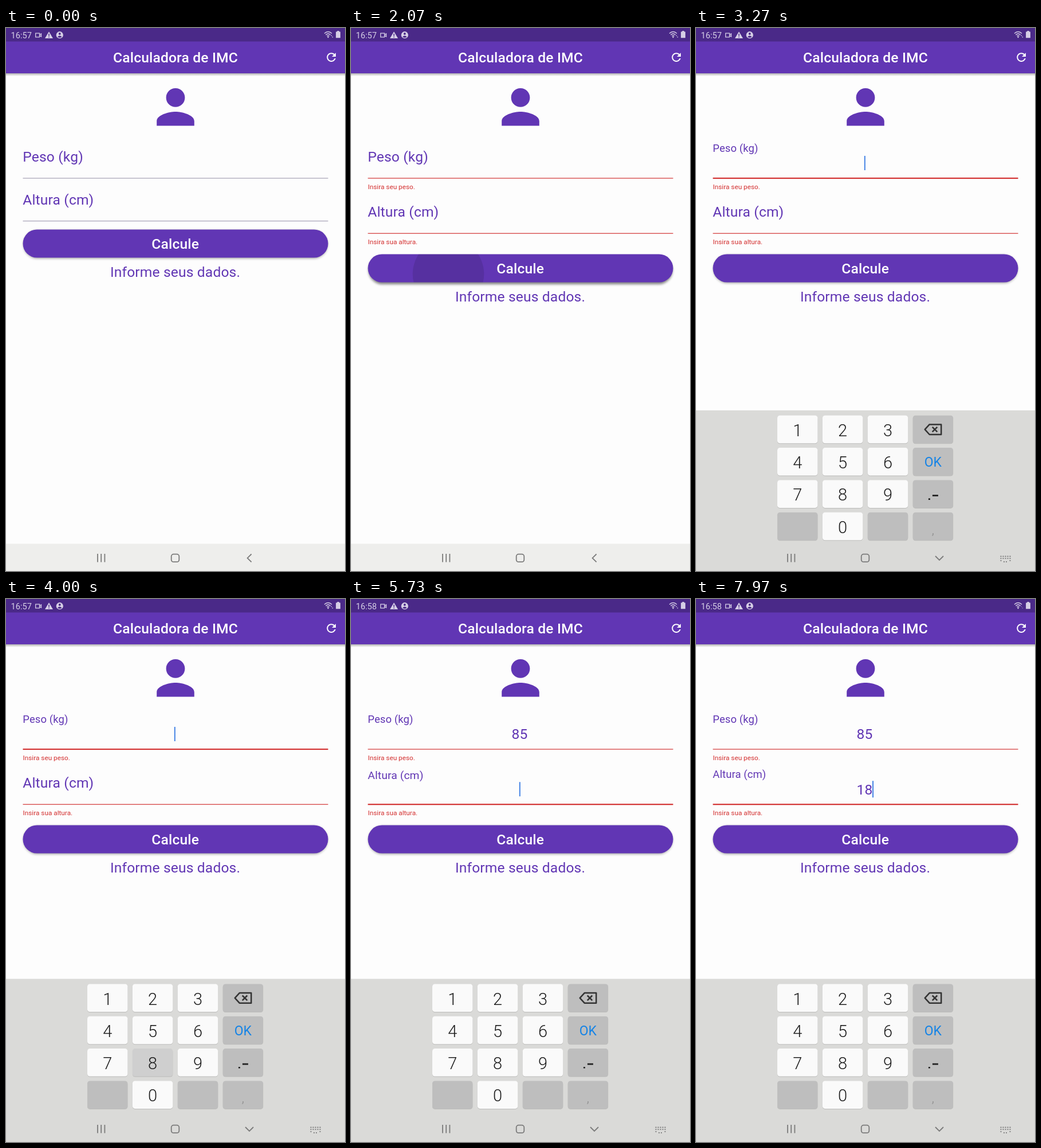
Write an HTML page that moves like this. It is 592 by 947 pixels and loops after 8000 ms.

```html
<!DOCTYPE html>
<html lang="pt">
<head>
<meta charset="utf-8">
<title>IMC</title>
<style>
  html, body { margin: 0; width: 100%; height: 100%; overflow: hidden; background: #fdfdfd; }
  svg { display: block; width: 100%; height: 100%; font-family: Roboto, sans-serif; }
  .big { font-size: 24.6px; letter-spacing: .15px; }
  .mid { text-anchor: middle; }
  .bold { font-weight: 500; fill: #fff; }
  .err { font-size: 11.8px; fill: #d32f2f; }
  .digit { font-size: 29px; font-weight: 300; fill: #1c1c1c; }
  .line { fill: none; stroke: #7b7b7b; stroke-width: 1.8; }
</style>
</head>
<body>
<svg viewBox="0 0 592 947" preserveAspectRatio="none">
  <defs>
    <linearGradient id="barShade" x2="0" y2="1">
      <stop stop-color="#000" stop-opacity=".3"/>
      <stop offset="1" stop-color="#000" stop-opacity="0"/>
    </linearGradient>
    <filter id="soft" x="-5%" y="-30%" width="110%" height="170%"><feGaussianBlur stdDeviation="2"/></filter>
    <clipPath id="pill"><rect x="29.5" y="351.5" width="533" height="49" rx="24.5"/></clipPath>
  </defs>
  <rect width="592" height="947" fill="#fdfdfd"/>

  <rect y="79" width="592" height="5" fill="url(#barShade)"/>
  <rect width="592" height="79" fill="#6136b4"/>
  <rect width="592" height="23.5" fill="#4a2988"/>
  <text class="big mid bold" x="296" y="60">Calculadora de IMC</text>
  <path transform="translate(556.3 39.3) scale(.984)" fill="#fff" d="M17.65 6.35C16.2 4.9 14.21 4 12 4c-4.42 0-7.99 3.58-7.99 8s3.57 8 7.99 8c3.73 0 6.84-2.55 7.73-6h-2.08c-.82 2.33-3.04 4-5.65 4-3.31 0-6-2.69-6-6s2.69-6 6-6c1.66 0 3.14.69 4.22 1.78L13 11h7V4z"/>

  <g fill="#d6cfe6">
    <text id="clock" x="8.5" y="17.6" font-size="14.6"></text>
    <path d="M51.7 9.2h6.8v6.6h-6.8zM58.5 12l3-2v5l-3-2" fill="none" stroke="#d6cfe6" stroke-width="1.3"/>
    <path d="M75 6.2 82 18H68z"/>
    <path d="M75 10v4M75 15v1.6" stroke="#4a2988" stroke-width="1.5"/>
    <circle cx="93.8" cy="12.2" r="6.1"/>
    <circle cx="93.8" cy="10" r="1.9" fill="#4a2988"/>
    <path d="M90 15.6q3.8-4 7.6 0-3.8 2.6-7.6 0" fill="#4a2988"/>
    <path d="M556 9.5q6.5-6 13 0M558.3 12q4.2-4 8.4 0M560.5 14.3q2-2 4 0" fill="none" stroke="#d6cfe6" stroke-width="1.4"/>
    <circle cx="562.5" cy="16" r="1.2"/>
    <path id="traffic" d="M567.2 13.8 568.4 12l1.2 1.8zM569 15.2h2.4l-1.2 1.8z"/>
    <path d="M578.3 5h3.4v1.6h2.2v10.7h-7.8V6.6h2.2z"/>
  </g>

  <path transform="translate(246.8 88.6) scale(4.1)" fill="#6136b4" d="M12 12c2.21 0 4-1.79 4-4s-1.79-4-4-4-4 1.79-4 4 1.79 4 4 4zm0 2c-2.67 0-8 1.34-8 4v2h16v-2c0-2.66-5.33-4-8-4z"/>

  <g id="fields"></g>

  <g id="lower">
    <rect id="shadow" x="30.5" y="353" width="531" height="49" rx="24.5" filter="url(#soft)"/>
    <rect x="29.5" y="351.5" width="533" height="49" rx="24.5" fill="#6136b4"/>
    <g clip-path="url(#pill)"><circle id="ripple" fill="#000"/></g>
    <text class="big mid bold" x="295.7" y="385">Calcule</text>
    <text class="big mid" x="295.5" y="433.7" fill="#6136b4">Informe seus dados.</text>
  </g>

  <rect y="899.5" width="592" height="47.5" fill="#eeeeec"/>
  <g id="keyboard"><rect y="662.5" width="592" height="300" fill="#dadad8"/></g>
  <g class="line">
    <path d="M160 917v14.5M166.2 917v14.5M172.4 917v14.5"/>
    <rect x="288.7" y="917.6" width="13.6" height="13.6" rx="4"/>
    <path id="back" d="M428.6 917.5 421.6 924.4 428.6 931.3"/>
    <path id="down" d="M418 921 425 928 432 921"/>
    <path id="kbIcon" stroke-dasharray="2 2" d="M531.5 921.5h18M531.5 925.2h18M531.5 928.8h2m3.5 2h8M547.5 928.8h2"/>
  </g>
</svg>
<script>
const LOOP = 8000;
const OPEN = 815, FOCUS = 2950, NEXT = 5600, KB_START = 3000, KB_TIME = 360, KB_HEIGHT = 285;
const PURPLE = '#6136b4';
const $ = id => document.getElementById(id);

const TAPS = [
  { down: 781, up: 830, x: 468, y: 379, speed: .306, reach: 440 },
  { down: 1912, up: 2080, x: 170, y: 386, speed: .392, reach: 393 }
];
// key, pressed, released
const PRESSES = [['8', 3960, 4050], ['5', 4360, 4450], ['OK', 5520, 5600], ['1', 6360, 6450], ['8', 7400, 7490]];

const FIELDS = [
  { name: 'Peso (kg)', error: 'Insira seu peso.', y: 0, gap: 0, focus: FOCUS, blur: NEXT, typed: [[4050, '8'], [4450, '85']] },
  { name: 'Altura (cm)', error: 'Insira sua altura.', y: 74.6, gap: 21.6, focus: NEXT, blur: Infinity, typed: [[6450, '1'], [7490, '18']] }
];

const progress = (t, start, length) => Math.min(1, Math.max(0, (t - start) / length));
const ease = u => u * u * (3 - 2 * u);
const mix = (a, b, u) => a + (b - a) * u;

function add(parent, tag, attrs, text = '') {
  const node = document.createElementNS('http://www.w3.org/2000/svg', tag);
  set(node, attrs);
  node.textContent = text;
  return parent.appendChild(node);
}
function set(node, attrs) {
  for (const name in attrs) node.setAttribute(name, attrs[name]);
}

for (const f of FIELDS) {
  f.group = add($('fields'), 'g', {});
  f.label = add(f.group, 'text', { class: 'big', fill: PURPLE }, f.name);
  f.rule = add(f.group, 'rect', { x: 29.5, width: 533 });
  f.hint = add(f.group, 'text', { class: 'err', x: 29.5 }, f.error);
  f.value = add(f.group, 'text', { class: 'big mid', x: 294.4, y: 244.4, fill: PURPLE });
  f.caret = add(f.group, 'rect', { width: 2, fill: '#4584e4' });
}

const keys = {};
[['1', '2', '3', 'del'], ['4', '5', '6', 'OK'], ['7', '8', '9', '.-'], ['', '0', '', ',']].forEach((row, r) =>
  row.forEach((key, c) => {
    const x = 142 + c * 78.9, y = 671.5 + r * 56.3, cx = x + 35.2;
    const isDigit = /\d/.test(key), fill = isDigit ? '#fafafa' : '#bebebe';
    const kb = $('keyboard');
    add(kb, 'rect', { x, y: y + 1, width: 70.4, height: 48.5, rx: 4.5, fill: '#bcbcba' });
    keys[key] = { fill, node: add(kb, 'rect', { x, y, width: 70.4, height: 48.5, rx: 4.5, fill }) };
    if (isDigit) add(kb, 'text', { class: 'digit mid', x: cx, y: y + 36 }, key);
    if (key === 'OK') add(kb, 'text', { class: 'mid', x: cx, y: y + 33, 'font-size': 23, fill: '#1483e6' }, key);
    if (key === '.-') add(kb, 'path', { d: `M${cx - 8} ${y + 33.2}h3M${cx - 1} ${y + 27}h10`, stroke: '#222', 'stroke-width': 2.6 });
    if (key === ',') add(kb, 'text', { class: 'mid', x: cx, y: y + 38, 'font-size': 21, fill: '#989898' }, key);
    if (key === 'del') add(kb, 'path', {
      d: `M${x + 29} ${y + 15.6}h20.5v17.6h-20.5l-8-8.8zM${x + 34} ${y + 20}l8.6 8.6m0-8.6l-8.6 8.6`,
      fill: 'none', stroke: '#333', 'stroke-width': 2.5, 'stroke-linejoin': 'round'
    });
  }));

function drawField(f, t) {
  const open = t >= OPEN;
  const red = progress(t, 835, 165);
  const float = ease(progress(t, f.focus, 170));
  const focused = t >= f.focus && t < f.blur;
  const last = f.typed.filter(step => step[0] <= t).pop();
  const text = last ? last[1] : '';
  const thick = focused ? 2.2 : 1.2;

  set(f.group, { transform: `translate(0 ${f.y + (open ? f.gap : 0)})` });
  set(f.label, { transform: `translate(29.3 ${mix(233, 215.7, float)}) scale(${mix(1, .75, float)})` });
  set(f.rule, {
    y: 262 - thick / 2, height: thick,
    fill: `rgb(${mix(166, 211, red)},${mix(161, 52, red)},${mix(181, 52, red)})`
  });
  set(f.hint, { y: mix(278, 281.2, red), opacity: red });
  f.value.textContent = text;

  // the blink restarts at focus and at each typed digit
  const since = t - (last ? last[0] : f.focus);
  const top = text ? 221 : 223;
  set(f.caret, {
    x: 293.8 + text.length * 7.1, y: top, height: 2 * (235.5 - top),
    opacity: focused && since % 1000 < 500 ? 1 : 0
  });
}

function drawButton(t) {
  const tap = TAPS.find(p => t >= p.down && t < p.up + 200);
  const lift = Math.max(...TAPS.map(p => progress(t, p.down - 80, 100) * (1 - progress(t, p.up + 100, 200))));
  set($('lower'), { transform: `translate(0 ${t >= OPEN ? 43 : 0})` });
  set($('shadow'), { y: mix(353, 355, lift), opacity: mix(.36, .48, lift) });
  if (!tap) return set($('ripple'), { opacity: 0 });
  const held = (Math.min(t, tap.up) - tap.down) * tap.speed;
  const r = held + Math.max(0, t - tap.up);
  set($('ripple'), { cx: tap.x, cy: tap.y, r: Math.min(r, tap.reach), opacity: .11 * (1 - progress(t, tap.up, 200)) });
}

function drawKeyboard(t) {
  const rest = (1 - progress(t, KB_START, KB_TIME)) ** 3;
  const shown = t >= KB_START;
  set($('keyboard'), { transform: `translate(0 ${rest * KB_HEIGHT})`, opacity: shown ? 1 : 0 });
  set($('back'), { opacity: shown ? 0 : 1 });
  set($('down'), { opacity: shown ? 1 : 0 });
  set($('kbIcon'), { opacity: shown ? 1 : 0 });
  for (const key in keys) {
    const pressed = PRESSES.some(([k, from, to]) => k === key && t >= from && t < to);
    set(keys[key].node, { fill: pressed ? '#cfcfcf' : keys[key].fill });
  }
}

function render(t) {
  $('clock').textContent = t < 5400 ? '16:57' : '16:58';
  set($('traffic'), { opacity: t < 6200 ? 1 : .45 });
  FIELDS.forEach(f => drawField(f, t));
  drawButton(t);
  drawKeyboard(t);
}

const began = performance.now();
function tick() {
  render((performance.now() - began) % LOOP);
  requestAnimationFrame(tick);
}
tick();
</script>
</body>
</html>
```
